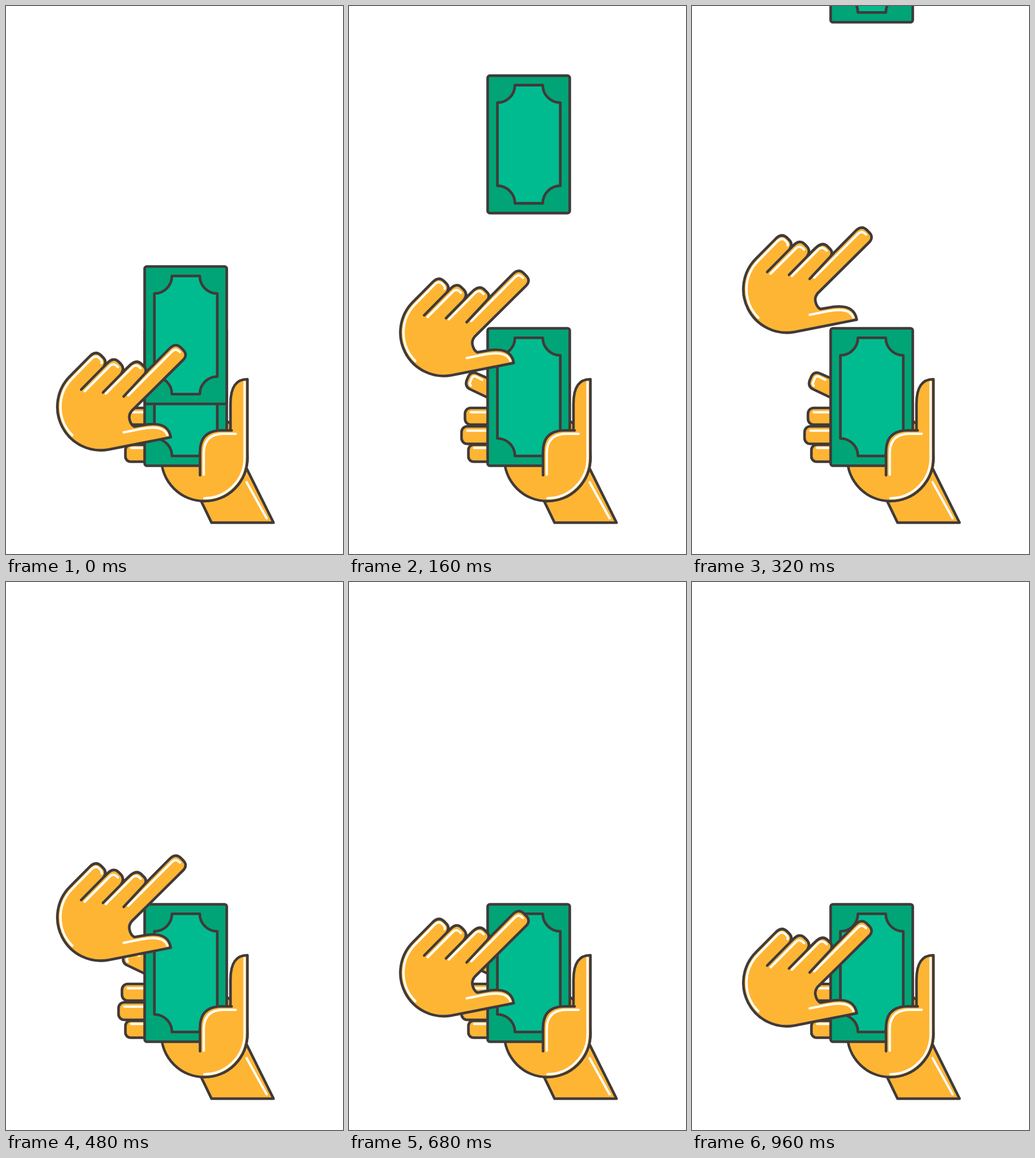
An HTML page that plays this animation: 587x953 px, repeating every 2000 ms.

```html
<!DOCTYPE html>
<html lang="en">
<head>
<meta charset="utf-8">
<title>Cash swipe</title>
<style>
  html, body { margin: 0; width: 100%; height: 100%; overflow: hidden; background: #fff; }
  svg { display: block; width: 100%; height: 100%; }
  .ink { stroke: #403a39; stroke-width: 4.6; stroke-linecap: round; stroke-linejoin: round; }
  .skin { fill: #ffb534; }
  .line { fill: none; }
  .shine { fill: none; stroke: #fff; stroke-width: 4; stroke-linecap: round; stroke-linejoin: round; }
</style>
</head>
<body>
<svg viewBox="0 0 587 953">
  <defs>
    <g id="note" class="ink">
      <rect x="241.5" y="560.5" width="143" height="239" rx="4" fill="#00a477"/>
      <path fill="#00bb90" d="M289 577H337.5A30.5 30.5 0 0 0 368 607.5V752A30.5 30.5 0 0 0 337.5 782.5H289A30.5 30.5 0 0 0 258.5 752V607.5A30.5 30.5 0 0 0 289 577Z"/>
    </g>
  </defs>

  <!-- holding hand, behind the notes -->
  <g class="ink skin">
    <path d="M415 796L466 898.5H358L338 857Z"/>
    <circle cx="345.5" cy="786" r="75"/>
    <path d="M250 651L223 639Q213 634.5 208 644L205 651Q201.500 661 210 666L250 685Z"/>
    <rect x="202" y="699" width="60" height="29" rx="10"/>
    <rect x="196" y="731" width="60" height="30.500" rx="10"/>
    <rect x="208" y="763" width="60" height="29.500" rx="9"/>
  </g>
  <path class="shine" d="M419 828L454 891M232 650L222 645Q216 642 213.500 648L210.500 656Q210 658 212 660M212 706.500H245M206 738.500H245M218 768.500H245"/>

  <use href="#note"/>
  <use href="#note" id="flyer"/>

  <!-- holding thumb, in front -->
  <path class="ink skin" d="M338 816V775Q338 738 376 738H393H391V692C391 662 401 649 420.500 649V786A75 75 0 0 1 345.500 861"/>
  <path class="shine" d="M344.500 815V778Q344.500 744 379 744H400M415.500 654V786A70 70 0 0 1 345.500 856"/>

  <!-- swiping hand -->
  <g id="swiper">
    <path class="ink skin" d="M111.600 643.600L145 610Q156 598.500 165.500 607.500L168.500 610.500Q176 617.500 171 626
      L175.500 622Q187 609.500 196 618.500L200 622.500Q207 630 201 639
      L214.500 626Q227 613.500 236 622.500L240 626.500Q246 632 242 639
      L285 595.500Q295.500 585 304.500 594L308 597.500Q317.500 606.500 308 616
      L219 704Q213.500 711 215 718Q217 728 223.500 731.500
      L247 727.500C270 725 284 731 287 750L178 771.400A75.500 75.500 0 0 1 111.600 643.600Z"/>
    <path class="shine" d="M115.500 746.500A70 70 0 0 1 115.500 647.500L149 613.500Q156 607 161.500 611.500Q168 617 166.500 621
      M137 670L181 626Q187.500 619.500 195 628
      M174 674L220 628Q227 621.500 234.500 630
      M213 677L289 601Q296 594 303 602
      M205 741.500L238 735C258 731.500 276 733 281 746"/>
    <path class="ink line" d="M131 667L173 624.500M169 672L205 635.500M205 679L246 635"/>
  </g>
</svg>
<script>
  const LOOP = 2000, STEP = 40;
  const flyer = document.getElementById('flyer');
  const swiper = document.getElementById('swiper');

  // swipe path: time (ms), offset (px), speed (px/ms)
  const keys = [
    [0, 0, 0], [280, -213, 0], [320, -204.5, .3], [480, -114, .75],
    [560, -57.5, .55], [680, -17.5, .13], [840, -5, .05], [960, 0, 0], [LOOP, 0, 0]
  ];

  function swipeAt(t) {
    const i = keys.findIndex(k => k[0] > t);
    const [t0, y0, v0] = keys[i - 1], [t1, y1, v1] = keys[i];
    const d = t1 - t0, s = (t - t0) / d, r = 1 - s;
    return r * r * ((1 + 2 * s) * y0 + s * d * v0) + s * s * ((1 + 2 * r) * y1 - r * d * v1);
  }

  const flyAt = t => -107.5 - 2.074 * t;

  const shift = (el, y) => el.setAttribute('transform', `translate(0 ${y.toFixed(2)})`);

  // motion is held on a 25 fps grid
  function draw(ms) {
    const t = Math.floor(((ms + 1) % LOOP) / STEP) * STEP;
    shift(flyer, flyAt(t));
    shift(swiper, swipeAt(t));
  }

  const start = performance.now();
  function tick() {
    draw(performance.now() - start);
    requestAnimationFrame(tick);
  }
  tick();
</script>
</body>
</html>
```
